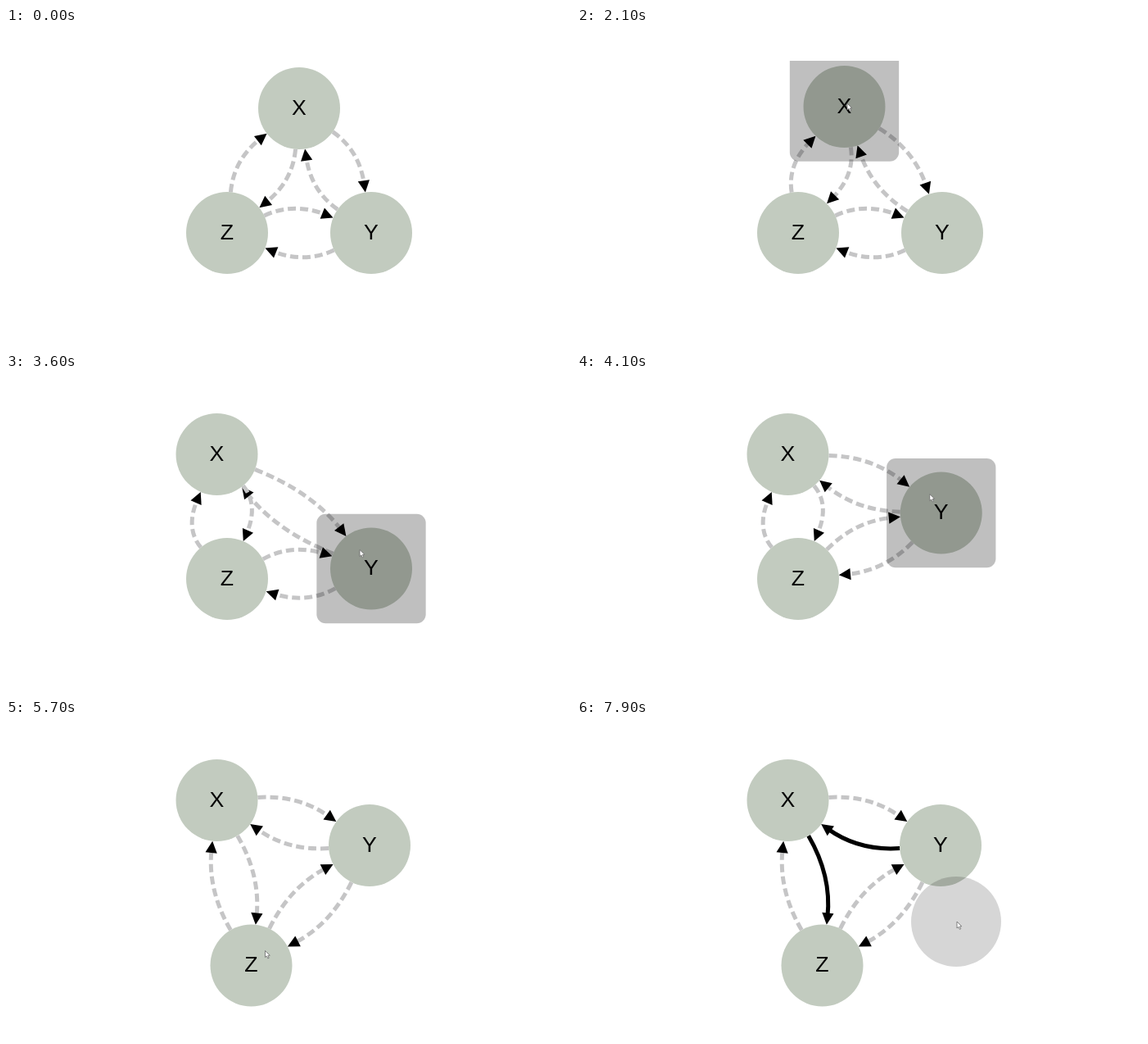
An HTML page with a canvas that plays this animation: 690 px wide and 388 px high, repeating every 8000 ms.

```html
<!DOCTYPE html>
<html lang="en">
<head>
<meta charset="utf-8">
<title>Graph dragging</title>
<style>
  html, body { margin: 0; width: 100%; height: 100%; overflow: hidden; background: #fff; }
  canvas { display: block; }
</style>
</head>
<body>
<canvas width="690" height="388"></canvas>
<script>
const ctx = document.querySelector('canvas').getContext('2d');
const LOOP = 8000, STEP = 100, RADIUS = 50, PAD = 50 / 3, ARROW = 14.3;
const SHADE = 'rgba(0,0,0,.25)';

// Pointer path: time, x, y
const pointerPath = [
  [900, 149, 4], [1100, 232, 40], [1300, 312, 74], [1500, 354, 91], [1600, 361.5, 94],
  [1900, 361.5, 94], [2100, 330, 92], [2500, 272, 90], [2700, 261, 94],
  [2900, 261, 94], [3300, 418, 216], [3400, 432, 227], [3500, 432, 227],
  [3600, 432, 214.5], [4200, 430.5, 133], [4300, 430, 130], [4400, 430, 130],
  [4700, 287, 232], [4900, 287, 232], [5400, 314, 277], [5500, 316.5, 281.5],
  [5700, 316.5, 281.5], [6100, 304, 195], [6600, 304, 195], [6800, 350, 151],
  [7000, 350, 151], [7400, 453, 213], [7700, 464, 246]
];

// Each node follows the pointer between press and release
const nodes = {
  X: { x: 358, y: 98, press: 1900, release: 2900 },
  Y: { x: 446, y: 250, press: 3600, release: 4400 },
  Z: { x: 270, y: 250, press: 4800, release: 5700 }
};

const edges = [
  { from: 'X', to: 'Y' },
  { from: 'Y', to: 'X', press: 6800, release: 7000 },
  { from: 'Y', to: 'Z' },
  { from: 'Z', to: 'Y' },
  { from: 'Z', to: 'X' },
  { from: 'X', to: 'Z', press: 6200, release: 6400 }
];

function pointerAt(t) {
  const next = pointerPath.findIndex(key => key[0] > t);
  if (next < 1) return pointerPath.at(next).slice(1);
  const [t0, x0, y0] = pointerPath[next - 1], [t1, x1, y1] = pointerPath[next];
  const k = (t - t0) / (t1 - t0);
  return [x0 + (x1 - x0) * k, y0 + (y1 - y0) * k];
}

function nodeAt(name, t) {
  const { x, y, press, release } = nodes[name];
  if (t < press) return { x, y };
  const [gx, gy] = pointerAt(press - STEP);
  const [px, py] = pointerAt(Math.min(t, release));
  return { x: x + px - gx, y: y + py - gy };
}

const isHeld = (item, t) => t >= item.press && t < item.release;
const polar = (p, r, a) => ({ x: p.x + r * Math.cos(a), y: p.y + r * Math.sin(a) });

function fillCircle(x, y, r, color) {
  ctx.fillStyle = color;
  ctx.beginPath();
  ctx.arc(x, y, r, 0, 2 * Math.PI);
  ctx.fill();
}

function fillPolygon(points) {
  ctx.beginPath();
  points.forEach(p => ctx.lineTo(p.x, p.y));
  ctx.closePath();
  ctx.fill();
}

function drawEdge(edge, t) {
  const a = nodeAt(edge.from, t), b = nodeAt(edge.to, t);
  const length = Math.hypot(b.x - a.x, b.y - a.y);
  const angle = Math.atan2(b.y - a.y, b.x - a.x);
  const gap = length - 2 * RADIUS;

  // The bow widens as the nodes come closer
  const leave = (2 + 1740 / gap) * Math.PI / 180;
  const arrive = (8 + 1050 / gap) * Math.PI / 180;
  const reach = length * Math.sin(arrive) / Math.sin(leave + arrive);
  const control = polar(a, reach, angle - leave);
  const start = polar(a, RADIUS, angle - leave);
  const heading = angle + arrive;
  const tip = polar(b, -RADIUS, heading);
  const end = polar(tip, -10, heading);

  const selected = t >= edge.release;
  ctx.beginPath();
  ctx.moveTo(start.x, start.y);
  ctx.quadraticCurveTo(control.x, control.y, end.x, end.y);
  ctx.lineWidth = 5;
  ctx.lineCap = 'butt';
  ctx.setLineDash(selected ? [] : [10, 5]);
  ctx.strokeStyle = selected ? '#000' : '#c5c5c6';
  ctx.stroke();

  if (isHeld(edge, t)) {
    ctx.setLineDash([]);
    ctx.lineCap = 'round';
    ctx.lineWidth = 5 + 2 * PAD;
    ctx.strokeStyle = SHADE;
    ctx.stroke();
  }

  const base = polar(tip, -ARROW, heading);
  ctx.fillStyle = '#000';
  fillPolygon([
    tip,
    polar(base, ARROW / 2, heading + Math.PI / 2),
    polar(base, ARROW / 2, heading - Math.PI / 2)
  ]);
}

function drawNode(name, t) {
  const { x, y } = nodeAt(name, t);
  fillCircle(x, y, RADIUS, '#c2cbbf');
  ctx.fillStyle = '#000';
  ctx.fillText(name, x, y + 7.5);
  if (isHeld(nodes[name], t)) {
    const half = RADIUS + PAD;
    ctx.fillStyle = SHADE;
    ctx.beginPath();
    ctx.roundRect(x - half, y - half, 2 * half, 2 * half, 11);
    ctx.fill();
  }
}

function drawPointer(t) {
  const [x, y] = pointerAt(t);
  const outline = [[0, 0], [0, 8], [1.9, 6.4], [3.3, 9.4], [4.7, 8.8], [3.4, 5.9], [5.8, 5.7]];
  ctx.fillStyle = '#fff';
  ctx.strokeStyle = '#666';
  ctx.lineWidth = 0.8;
  ctx.setLineDash([]);
  fillPolygon(outline.map(([dx, dy]) => ({ x: x + dx, y: y + dy })));
  ctx.stroke();
}

function draw(t) {
  ctx.fillStyle = '#fff';
  ctx.fillRect(0, 0, 690, 388);
  ctx.font = '26.7px "Liberation Sans", Arial, sans-serif';
  ctx.textAlign = 'center';

  ctx.save();
  ctx.beginPath();
  ctx.rect(0, 40, 690, 348);
  ctx.clip();
  edges.forEach(edge => drawEdge(edge, t));
  Object.keys(nodes).forEach(name => drawNode(name, t));
  if (t >= 7900) fillCircle(463, 246, 55, 'rgba(0,0,0,.16)');
  ctx.restore();

  if (t >= 900) drawPointer(t);
}

const began = performance.now();
function tick() {
  const t = (performance.now() - began) % LOOP;
  draw(Math.floor(t / STEP) * STEP);
  requestAnimationFrame(tick);
}
tick();
</script>
</body>
</html>
```
